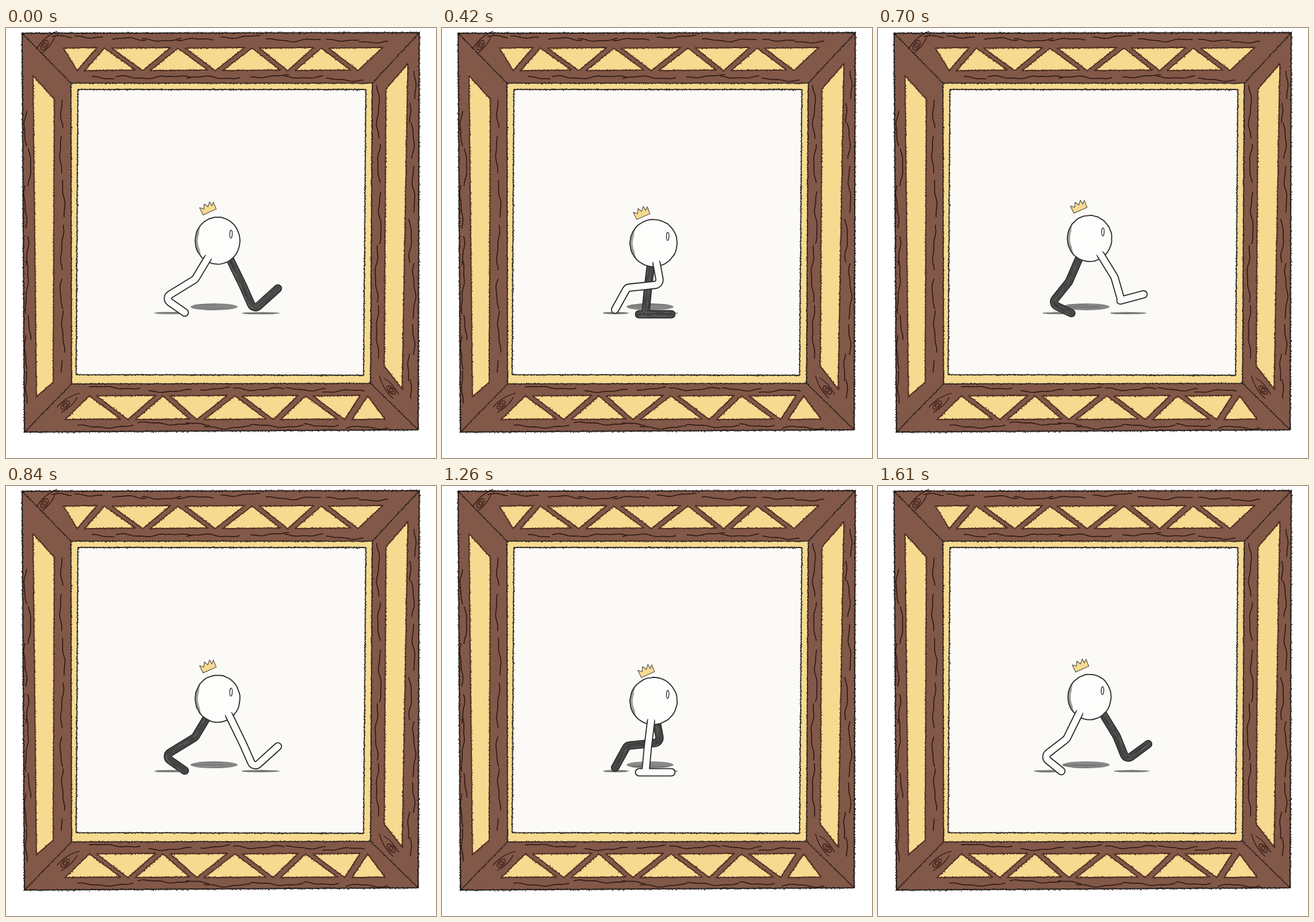
Write an HTML page with a canvas that moves like this. It is 748 px wide and 748 px high and loops after 1.68 s.

```html
<!DOCTYPE html>
<html lang="en">
<head>
<meta charset="utf-8">
<title>Framed walk</title>
<style>
html, body { margin: 0; width: 100%; height: 100%; overflow: hidden; background: #fff; }
canvas { display: block; width: 748px; height: 748px; }
</style>
</head>
<body>
<canvas id="stage" width="748" height="748"></canvas>
<script>
const SIZE = 748, STEP = 70, STEPS = 24, HALF = 12;
const WOOD = '#825849', GOLD = '#f6da90', PAPER = '#fbfaf6', WHITE = '#fdfdfb';
const INK = '#1c1816', GRAIN = '#2e1712', BEAM_EDGE = '#4b281e';
const stage = document.getElementById('stage').getContext('2d');
let c = stage;
let seed = 1;

function rand() {
  seed = (seed * 16807) % 2147483647;
  return seed / 2147483647;
}
const jitter = amount => (rand() - 0.5) * 2 * amount;
const mix = (a, b, t) => a + (b - a) * t;

function outline(points, closed) {
  const path = new Path2D();
  points.forEach(([x, y]) => path.lineTo(x, y));
  if (closed) path.closePath();
  return path;
}

function oval(x, y, rx, ry, turn = 0) {
  const path = new Path2D();
  path.ellipse(x, y, rx, ry, turn, 0, Math.PI * 2);
  return path;
}

function fill(path, color) {
  c.fillStyle = color;
  c.fill(path);
}

function stroke(path, color, width) {
  c.strokeStyle = color;
  c.lineWidth = width;
  c.lineCap = c.lineJoin = 'round';
  c.stroke(path);
}

// Crumbly edge: a thin core with grains scattered around it
function charcoal(points, color, width, closed) {
  stroke(outline(points, closed), color, width * 0.7);
  c.fillStyle = color;
  for (let i = closed ? 0 : 1; i < points.length; i++) {
    const [x0, y0] = points.at(i - 1), [x1, y1] = points[i];
    const length = Math.hypot(x1 - x0, y1 - y0);
    for (let d = 0; d < length; d += 1.1) {
      const t = d / length, size = 0.7 + rand() * 0.9;
      c.fillRect(mix(x0, x1, t) + jitter(width * 0.8) - 0.5, mix(y0, y1, t) + jitter(width * 0.8) - 0.5, size, size);
    }
  }
}

function inlay(points) {
  fill(outline(points, true), GOLD);
  charcoal(points, BEAM_EDGE, 2, true);
}

// ---- wooden frame ----
const OUTER = [[28, 9], [719, 8], [717, 699], [32, 703]];
const BAND = [[113, 96], [637, 96], [634, 618], [114, 619]];
const SHEET = [[125, 107], [626, 107], [622, 604], [122, 603]];

// Alternating triangles separated by a zigzag beam through the tips
function zigzag(tips, start, end, high, low, pointsUp) {
  const gap = 13;
  tips.forEach((tip, i) => {
    const up = (i % 2 === 0) === pointsUp;
    const tipY = up ? high : low, baseY = up ? low : high;
    inlay([
      [i ? tips[i - 1] + gap : start, baseY],
      [tip, tipY],
      [i + 1 < tips.length ? tips[i + 1] - gap : end, baseY - 1]
    ]);
  });
}

// A row of wavy strokes of random length running along a plank
function grainRow(lane, from, to, vertical) {
  for (let start = from; start < to - 20; ) {
    const end = Math.min(to, start + 35 + rand() * 65);
    const offset = lane + jitter(4.5), shift = rand() * 6, wave = 11 + rand() * 6;
    const points = [];
    for (let p = start; p <= end; p += 2) {
      const side = offset + Math.sin(p / wave + shift) * 2.2 + Math.sin(p / 5 + shift) * 0.7;
      points.push(vertical ? [side, p] : [p, side]);
    }
    stroke(outline(points), GRAIN, 1.6);
    start = end + jitter(14) + 4;
  }
}

function knot(x, y, turn) {
  c.save();
  c.translate(x, y);
  c.rotate(turn);
  stroke(oval(0, 0, 2.5, 4), GRAIN, 1.3);
  stroke(oval(0, 0, 5, 9), GRAIN, 1.3);
  stroke(new Path2D('M -8 12 Q -9 -12 4 -32 M 4 14 Q 11 -8 6 -24'), GRAIN, 1.3);
  c.restore();
}

function paintFrame() {
  const layer = document.createElement('canvas');
  layer.width = layer.height = SIZE;
  c = layer.getContext('2d');
  c.fillStyle = '#fff';
  c.fillRect(0, 0, SIZE, SIZE);
  fill(outline(OUTER, true), WOOD);

  grainRow(19, 80, 680, false);
  grainRow(86, 150, 640, false);
  grainRow(629, 145, 630, false);
  grainRow(691, 125, 690, false);
  grainRow(37, 145, 665, true);
  grainRow(96, 125, 600, true);
  grainRow(647, 100, 595, true);
  grainRow(706, 75, 645, true);
  knot(67, 30, 0.6);
  knot(103, 656, 0.75);
  knot(670, 630, -0.8);

  inlay([[47, 83], [84, 124], [82, 616], [53, 641]]);
  inlay([[699, 62], [661, 106], [658, 588], [689, 628]]);
  zigzag([124, 171, 238, 299, 364, 428, 490, 548, 612], 100, 655, 35, 74, false);
  zigzag([145, 212, 273, 332, 398, 465, 521, 589, 629], 103, 659, 640, 681, true);

  OUTER.forEach((corner, i) => charcoal([corner, BAND[i]], INK, 1.1));
  fill(outline(BAND, true), GOLD);
  fill(outline(SHEET, true), PAPER);
  charcoal(BAND, INK, 1.6, true);
  charcoal(SHEET, INK, 1.8, true);
  charcoal(OUTER, INK, 2.2, true);
  c = stage;
  return layer;
}

// ---- walker ----
// Knee, ankle and toe of one leg over a full stride; the other leg is half a stride behind
const STRIDE = {
  0: [412, 448, 431, 491, 473, 453],
  2: [421, 450, 407, 496, 460, 496],
  6: [358, 455, 354, 498, 399, 498],
  8: [340, 445, 329, 496, 371, 496],
  11: [328, 440, 288, 471, 319, 496],
  12: [329, 437, 275, 470, 311, 495],
  14: [325, 443, 273, 449, 292, 495],
  18: [380, 446, 322, 452, 301, 490],
  20: [404, 430, 405, 467, 446, 492],
  23: [415, 435, 432, 477, 470, 449]
};
STRIDE[STEPS] = STRIDE[0];

// Height and radii of the body; it bounces once for each half stride
const BOUNCE = { 0: [370, 39, 41], 2: [395, 46, 35.5], 6: [374, 41, 41], 8: [364, 41, 41], 11: [367, 37.5, 39.5] };
BOUNCE[HALF] = BOUNCE[0];
const BODY_X = 368;

function tween(track, at) {
  const keys = Object.keys(track).map(Number);
  const next = keys.find(k => k >= at);
  if (next === at) return track[at];
  const prev = keys[keys.indexOf(next) - 1];
  return track[prev].map((v, i) => mix(v, track[next][i], (at - prev) / (next - prev)));
}

function bodyAt(step) {
  const [y, rx, ry] = tween(BOUNCE, (step + STEPS) % HALF);
  return { y, rx, ry, top: y - ry };
}

// The hip slides along the underside of the body, half as far as the knee
function legAt(step, body) {
  const [kneeX, kneeY, ankleX, ankleY, toeX, toeY] = tween(STRIDE, step % STEPS);
  const swing = (kneeX - BODY_X) / 2;
  const hip = [BODY_X + swing, body.y + body.ry * Math.sqrt(1 - (swing / body.rx) ** 2) - 1];
  return { hip, knee: [kneeX, kneeY], ankle: [ankleX, ankleY], toe: [toeX, toeY] };
}

function legPath({ hip, knee, ankle, toe }, lift) {
  const [hx, hy] = hip, [kx, ky] = knee, [ax, ay] = ankle, [tx, ty] = toe;
  const t = lift / Math.hypot(kx - hx, ky - hy);
  const flat = Math.max(0, 1 - Math.abs(ty - ay) / 12);
  const path = new Path2D();
  path.moveTo(mix(hx, kx, -t), mix(hy, ky, -t));
  path.arcTo(kx, ky, ax, ay, 9);
  if (flat) {
    path.lineTo(ax, ay);
    path.lineTo(mix(ax, tx, -0.25 * flat), mix(ay, ty, -0.25 * flat));
  } else {
    path.arcTo(ax, ay, tx, ty, 8);
  }
  path.lineTo(tx, ty);
  return path;
}

function darkLeg(leg) {
  const path = legPath(leg, 0);
  stroke(path, '#2f2f2f', 14.5);
  stroke(path, '#484848', 11);
  c.globalAlpha = 0.5;
  for (let i = 0; i < 10; i++) {
    c.save();
    c.translate(jitter(4.5), jitter(4));
    c.setLineDash([6 + rand() * 20, 8 + rand() * 30]);
    stroke(path, i % 3 ? '#2a2a2a' : '#858585', 1);
    c.restore();
  }
  c.globalAlpha = 1;
}

function whiteLeg(leg) {
  stroke(legPath(leg, 4), '#2b2b2b', 14.5);
  stroke(legPath(leg, 8), WHITE, 10.8);
}

function shadow(x, y, rx, ry) {
  c.globalAlpha = 0.85;
  fill(oval(x, y, rx, ry), '#727272');
  c.globalAlpha = 0.5;
  for (let i = 0; i < 7; i++) {
    const dy = jitter(ry), half = rx * Math.sqrt(1 - (dy / ry) ** 2);
    stroke(outline([[x - half, y + dy], [x + half * rand(), y + dy]]), i % 2 ? '#444' : '#999', 0.8);
  }
  c.globalAlpha = 1;
}

function footShadow({ ankle, toe }) {
  const lifted = 496 - Math.min(ankle[1], toe[1]);
  shadow((ankle[0] + toe[0]) / 2 - lifted * 0.2, 496, Math.abs(toe[0] - ankle[0]) / 2 + 12, 2);
}

function drawBody({ y, rx, ry }) {
  fill(oval(BODY_X, y, rx, ry), WHITE);
  const points = Array.from({ length: 48 }, (_, i) => {
    const a = i / 48 * Math.PI * 2;
    return [BODY_X + Math.cos(a) * rx + jitter(0.35), y + Math.sin(a) * ry + jitter(0.35)];
  });
  stroke(outline(points, true), '#303030', 1.9);
  // Soft pencil shading on the left rim
  c.globalAlpha = 0.5;
  for (let i = 0; i < 4; i++) {
    const rim = new Path2D();
    rim.ellipse(BODY_X + i * 1.2, y, rx - 0.5, ry - 1, 0, 2.4 + i * 0.1, 3.8 - i * 0.1);
    stroke(rim, '#444', 1.3);
  }
  c.globalAlpha = 1;
  stroke(oval(BODY_X + rx * 0.6, y - ry * 0.28, 2.2, 7, 0.05), '#333', 1.4);
}

// The crown floats above the body and trails its bounce a little
function drawCrown(step) {
  const top = (bodyAt(step).top + bodyAt(step - 1).top) / 2;
  const path = new Path2D('M -12 8 L -13 -6 L -7 -1 L -3 -9 L 1 -2 L 7 -9 L 8 -1 L 13 -6 L 13 7 Z');
  c.save();
  c.translate(351 - 4 * Math.sin(step / STEPS * Math.PI * 2), top - 15);
  c.rotate(-0.38);
  fill(path, GOLD);
  stroke(path, '#5a5751', 1.2);
  c.restore();
}

const frame = paintFrame();

function draw(step) {
  seed = 977 + step * 7919;
  c.drawImage(frame, 0, 0);
  const body = bodyAt(step);
  const dark = legAt(step, body), white = legAt(step + HALF, body);
  shadow(362, 485, 41, 6);
  footShadow(dark);
  footShadow(white);
  darkLeg(dark);
  drawBody(body);
  whiteLeg(white);
  drawCrown(step);
}

function tick(now) {
  draw(Math.floor(now / STEP) % STEPS);
  requestAnimationFrame(tick);
}
draw(0);
requestAnimationFrame(tick);
</script>
</body>
</html>
```
